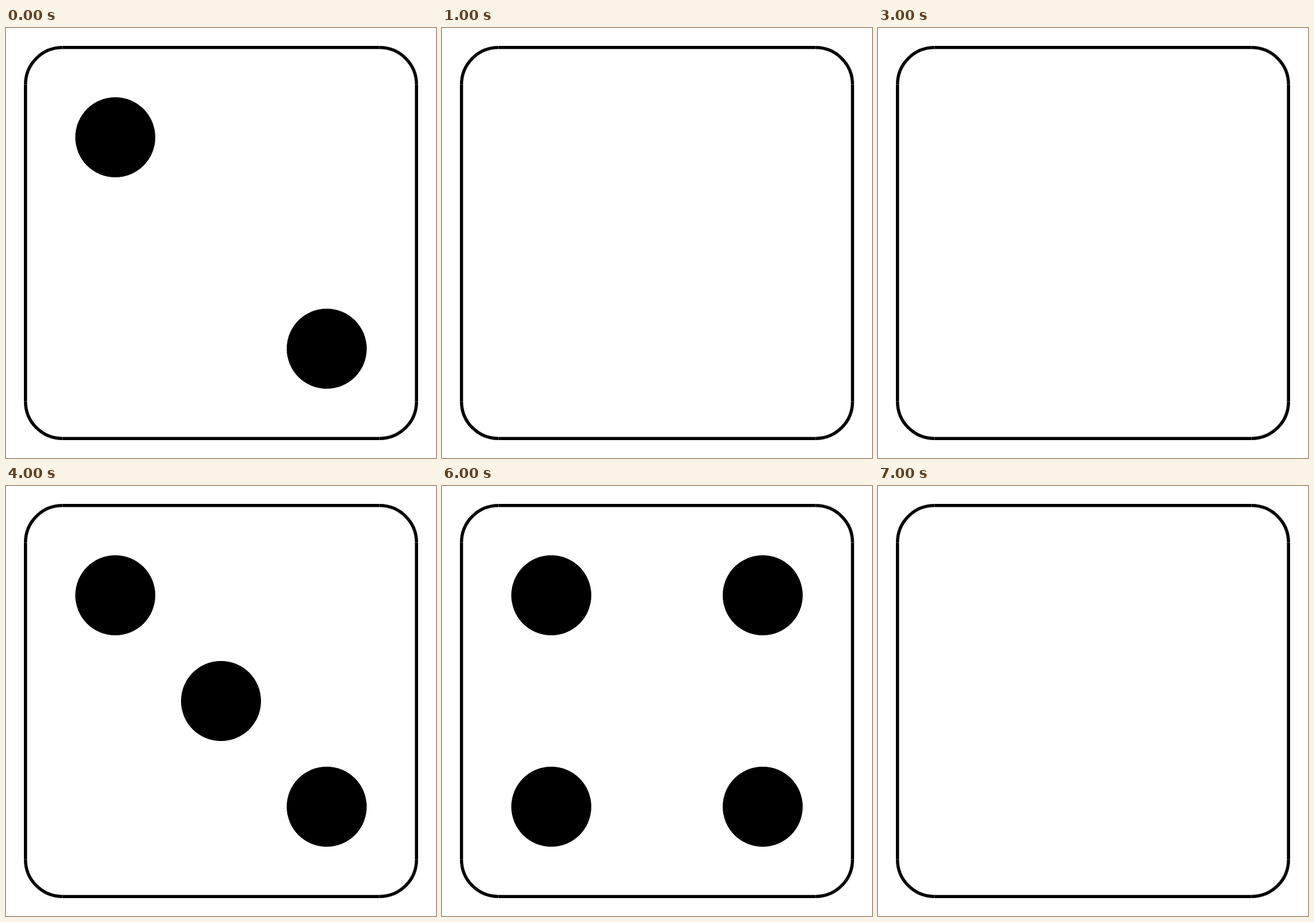
Animation of 720x720 px, one loop 8000 ms. Source, as an HTML page:

```html
<!DOCTYPE html>
<html lang="en">
<head>
<meta charset="utf-8">
<title>Die</title>
<style>
  html, body { margin: 0; width: 100%; height: 100%; overflow: hidden; background: #fff; }
  svg { display: block; width: 100vw; height: 100vh; }
  .edge { fill: none; stroke: #000; stroke-width: 5.3; }
  .face { visibility: hidden; animation: show 8s step-end infinite; animation-delay: calc(var(--i) * 2s - 8s); }
  @keyframes show {
    0% { visibility: visible; }
    12.5%, 100% { visibility: hidden; }
  }
</style>
</head>
<body>
<svg viewBox="0 0 720 720">
  <defs>
    <circle id="pip" r="67"/>
    <g id="falling">
      <use href="#pip" x="183" y="183"/>
      <use href="#pip" x="537" y="537"/>
    </g>
    <g id="rising">
      <use href="#pip" x="537" y="183"/>
      <use href="#pip" x="183" y="537"/>
    </g>
    <use id="middle" href="#pip" x="360" y="360"/>
    <!-- one side and one corner, turned four times -->
    <g id="quarter" class="edge">
      <path d="M94.6 32.65H625.4"/>
      <path d="M625.4 32.65A61.95 61.95 0 0 1 687.35 94.6"/>
    </g>
  </defs>

  <use href="#quarter"/>
  <use href="#quarter" transform="rotate(90 360 360)"/>
  <use href="#quarter" transform="rotate(180 360 360)"/>
  <use href="#quarter" transform="rotate(270 360 360)"/>

  <g class="face" style="--i:0"><use href="#falling"/></g>
  <g class="face" style="--i:1"><use href="#falling"/><use href="#rising"/><use href="#middle"/></g>
  <g class="face" style="--i:2"><use href="#falling"/><use href="#middle"/></g>
  <g class="face" style="--i:3"><use href="#falling"/><use href="#rising"/></g>
</svg>
</body>
</html>
```
